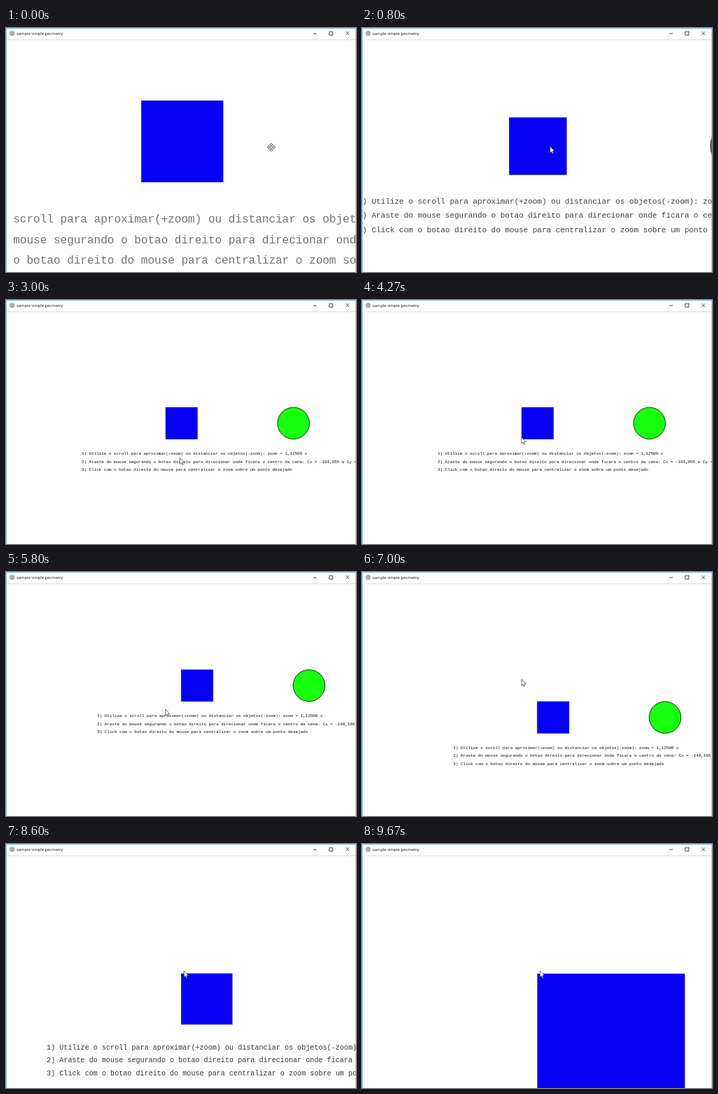
Recreate the animation shown at these times as an HTML page with a canvas. Size 500 px wide and 350 px high, loop 9.79 s.

```html
<!DOCTYPE html>
<html lang="pt">
<head>
<meta charset="utf-8">
<title>sample simple geometry</title>
<style>
  html, body { margin: 0; width: 100%; height: 100%; overflow: hidden; background: #fff; }
  canvas { display: block; }
</style>
</head>
<body>
<canvas id="stage" width="500" height="350"></canvas>
<script>
const ctx = document.getElementById('stage').getContext('2d');
const LOOP = 9790;
const UNIT = 0.5057;                 // stage pixels per scene unit at zoom 1
const VIEW = { x: 250.2, y: 185.75 };
const SQUARE = { x: -100, y: 0, size: 80 };
const CIRCLE = { x: 181, y: 0, r: 40 };
const TEXT = { x: -351, y: -80, leading: 20, size: 11 };

const FIRST_NOTCH = 9;
const SCROLLS = [
  { start: 600, end: 870, to: 5 },
  { start: 1670, end: 2150, to: 1 },
  { start: 7670, end: 8000, to: 3 },
  { start: 8270, end: 8530, to: 5 },
  { start: 8670, end: 8870, to: 11 },
  { start: 9400, end: 9660, to: 14 }
];

const FIRST_POINT = { x: 379, y: 171 };
const MOVES = [
  { start: 70, end: 400, x: 268.7, y: 170 },
  { start: 2400, end: 3330, x: 240, y: 249 },
  { start: 3330, end: 4070, x: 227.8, y: 197 },
  { start: 6600, end: 6670, x: 228, y: 154 },
  { start: 7400, end: 7530, x: 254.3, y: 182 }
];

const progress = (t, { start, end }) => Math.min(1, Math.max(0, (t - start) / (end - start)));
const smooth = p => p * p * (3 - 2 * p);
const decimal = (value, digits) => value.toFixed(digits).replace('.', ',');

// The wheel turns in whole notches, evenly spread over each scroll.
function zoomAt(t) {
  let notch = FIRST_NOTCH;
  for (const scroll of SCROLLS) {
    if (t < scroll.start) break;
    const count = Math.abs(scroll.to - notch);
    const turned = 1 + Math.floor(progress(t, scroll) * (count - 1));
    notch += turned * Math.sign(scroll.to - notch);
  }
  return 1.125 ** notch;
}

// Two clicks centre the view on the lower, then the upper left corner of the square.
function cameraAt(t) {
  const reach = 40.166;
  if (t < 4930) return { x: -101.055, y: -15.822 };
  return { x: SQUARE.x - reach, y: t < 6870 ? -reach : reach };
}

function pointerAt(t) {
  return MOVES.reduce((from, move) => {
    const p = smooth(progress(t, move));
    return { x: from.x + (move.x - from.x) * p, y: from.y + (move.y - from.y) * p };
  }, FIRST_POINT);
}

function polygon(points) {
  ctx.beginPath();
  points.forEach(([x, y]) => ctx.lineTo(x, y));
  ctx.closePath();
}

function drawHelp(zoom, camera, toX, toY) {
  const lines = [
    `1) Utilize o scroll para aproximar(+zoom) ou distanciar os objetos(-zoom): zoom = ${decimal(zoom, 5)} x`,
    `2) Araste do mouse segurando o botao direito para direcionar onde ficara o centro da cena: Cx = ${decimal(camera.x, 3)} e Cy = ${decimal(camera.y, 3)}`,
    '3) Click com o botao direito do mouse para centralizar o zoom sobre um ponto desejado'
  ];
  const size = Math.round(TEXT.size * zoom);
  const pitch = Math.round(size * 0.6) * UNIT;   // whole-unit glyph advance
  const shade = Math.max(0, Math.min(115, size * 5 - 45));
  ctx.font = `${size * UNIT}px "Liberation Mono", "Courier New", monospace`;
  ctx.fillStyle = `rgb(${shade}, ${shade}, ${shade})`;
  lines.forEach((line, row) => {
    const y = toY(TEXT.y - row * TEXT.leading);
    [...line].forEach((char, i) => {
      const x = toX(TEXT.x) + i * pitch;
      if (x > -20 && x < 500) ctx.fillText(char, x, y);
    });
  });
}

function drawScene(t) {
  const zoom = zoomAt(t);
  const camera = cameraAt(t);
  const scale = zoom * UNIT;
  const toX = x => VIEW.x + (x - camera.x) * scale;
  const toY = y => VIEW.y - (y - camera.y) * scale;

  const side = SQUARE.size * scale;
  const box = [toX(SQUARE.x) - side / 2, toY(SQUARE.y) - side / 2, side, side];
  ctx.fillStyle = '#0600f5';
  ctx.fillRect(...box);
  ctx.strokeStyle = 'rgba(20, 10, 190, 0.5)';
  ctx.lineWidth = 0.9;
  ctx.strokeRect(...box);

  ctx.beginPath();
  ctx.arc(toX(CIRCLE.x), toY(CIRCLE.y), CIRCLE.r * scale, 0, Math.PI * 2);
  ctx.fillStyle = '#18ff10';
  ctx.fill();
  ctx.strokeStyle = '#061006';
  ctx.lineWidth = 0.75 * zoom;
  ctx.stroke();

  drawHelp(zoom, camera, toX, toY);
}

function drawWindow() {
  ctx.fillStyle = '#fff';
  ctx.fillRect(0, 0, 500, 16);
  ctx.fillStyle = '#e6e6e6';
  ctx.fillRect(0, 16, 500, 1);
  ctx.fillStyle = '#f4f4f4';
  ctx.fillRect(0, 17, 500, 1);
  ctx.fillStyle = '#74b2e0';
  ctx.fillRect(0, 0, 500, 0.8);
  ctx.fillRect(0, 0, 0.8, 350);
  ctx.fillRect(499.4, 0, 0.6, 350);

  ctx.fillStyle = '#a9adb2';
  ctx.beginPath();
  ctx.arc(8.8, 7.7, 3.8, 0, Math.PI * 2);
  ctx.fill();

  ctx.font = '5.8px "Open Sans", "Noto Sans", sans-serif';
  ctx.fillStyle = '#111';
  ctx.fillText('sample simple geometry', 15, 10.2);

  ctx.strokeStyle = '#222';
  ctx.lineWidth = 0.8;
  ctx.strokeRect(461.8, 5.2, 5, 5);
  ctx.beginPath();
  ctx.moveTo(438.8, 8); ctx.lineTo(444, 8);
  ctx.moveTo(485.2, 5); ctx.lineTo(490.4, 10.2);
  ctx.moveTo(490.4, 5); ctx.lineTo(485.2, 10.2);
  ctx.stroke();
}

function drawArrow() {
  polygon([[0, 0], [0, 9], [2, 7.2], [3.5, 10.3], [4.9, 9.7], [3.5, 6.8], [6.2, 6.5]]);
}

function drawMoveCross() {
  const arm = [[-0.8, -0.8], [-0.8, -3.4], [-2.3, -3.4], [0, -6], [2.3, -3.4], [0.8, -3.4]];
  polygon([0, 1, 2, 3].flatMap(turn =>
    arm.map(([x, y]) => [[x, y], [-y, x], [-x, -y], [y, -x]][turn])));
}

function drawPointer(t) {
  const { x, y } = pointerAt(t);
  ctx.save();
  ctx.translate(x, y);
  if (t < MOVES[0].start) drawMoveCross(); else drawArrow();
  ctx.fillStyle = '#fff';
  ctx.strokeStyle = '#333';
  ctx.lineWidth = 0.7;
  ctx.fill();
  ctx.stroke();
  ctx.restore();
}

function render(t) {
  ctx.fillStyle = '#fefefe';
  ctx.fillRect(0, 0, 500, 350);
  drawScene(t);
  drawWindow();
  drawPointer(t);
}

const begin = performance.now();
function tick() {
  render((performance.now() - begin) % LOOP);
  requestAnimationFrame(tick);
}
tick();
</script>
</body>
</html>
```
